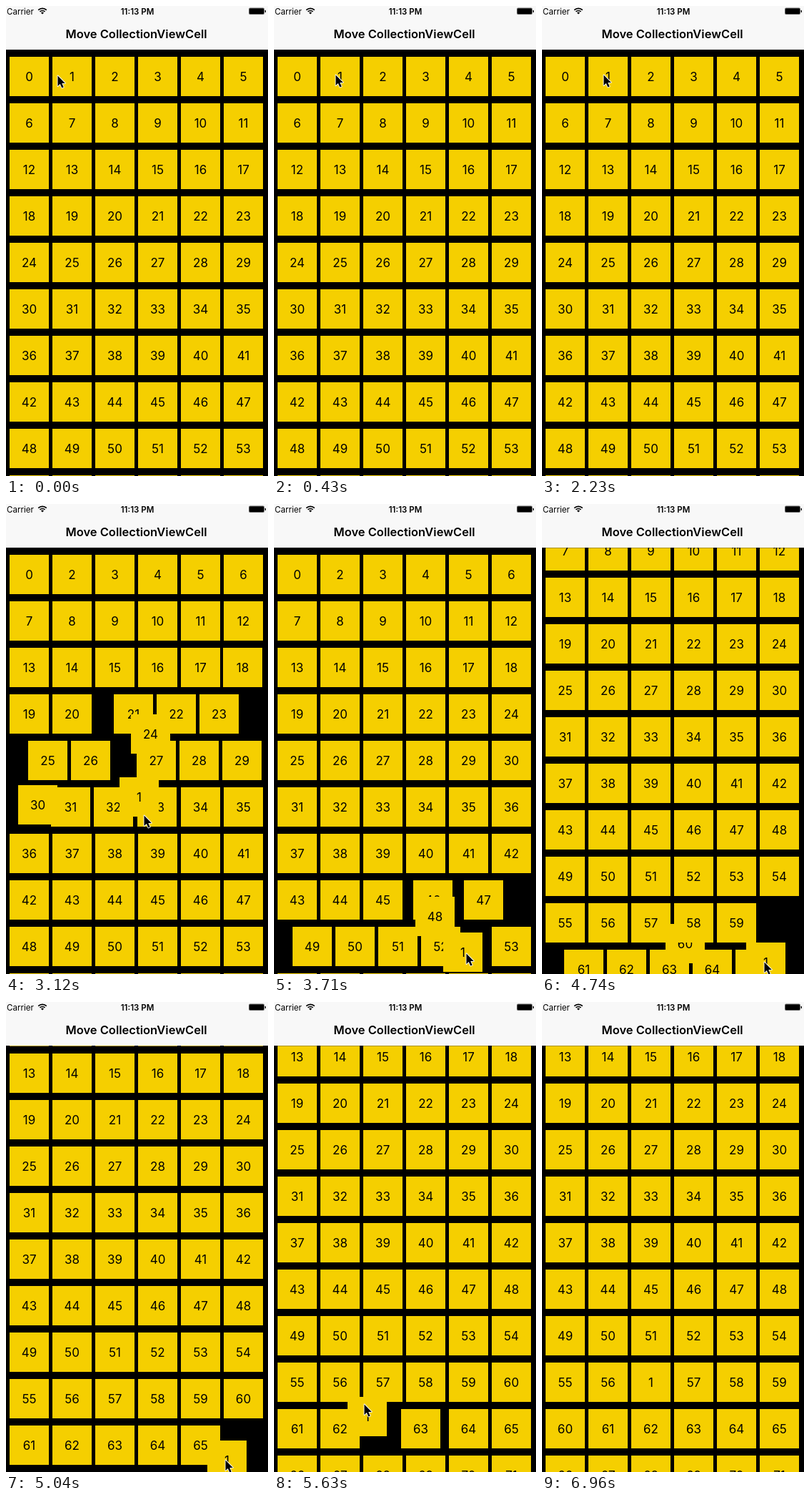
Animation of 367 by 657 pixels, one loop 7110 ms. Source, as an HTML page with a canvas:

```html
<!DOCTYPE html>
<html lang="en">
<head>
<meta charset="utf-8">
<title>Move CollectionViewCell</title>
<style>
html, body { margin: 0; width: 100%; height: 100%; overflow: hidden; background: #000; }
canvas { display: block; width: 367px; height: 657px; }
</style>
</head>
<body>
<canvas id="stage"></canvas>
<script>
const W = 367, H = 657, LOOP = 7110, STEP = 147.9, DRAG_START = 2230;
const CELL = 55, COLS = 6, COUNT = 72, NAV = 61;
const PICKUP = 2370, DROP = 6200, LAG = 50, SHIFT_TIME = 300;
const FONT = 'Inter, "Open Sans", sans-serif';

const canvas = document.getElementById('stage');
const ctx = canvas.getContext('2d');
const dpr = window.devicePixelRatio || 1;
canvas.width = W * dpr;
canvas.height = H * dpr;

// Key points of the pointer: time, x, y
const path = [
  [0, 73, 97], [430, 87, 96], [2450, 87, 96], [3270, 218, 512],
  [3490, 250, 589], [3600, 258, 624], [3710, 270, 628], [4100, 325, 638],
  [4740, 312, 640], [5050, 308, 640], [5400, 158, 620], [5560, 131, 587],
  [5630, 127, 562], [5800, 138, 537], [6250, 138, 537], [6810, 309, 651]
];

const clamp = (v, lo, hi) => Math.min(hi, Math.max(lo, v));
const mix = (a, b, u) => a + (b - a) * u;
const ease = u => { u = clamp(u, 0, 1); return u * u * (3 - 2 * u); };
const scrollAt = t => clamp((t - 3803) * 0.1045, 0, 152);

function snap(t) {
  if (t < DRAG_START) return t < 290 ? 0 : t < 430 ? 290 : 430;
  return DRAG_START + Math.floor((t - DRAG_START + 5) / STEP) * STEP;
}

function pointer(t) {
  const i = path.findIndex(p => p[0] > t);
  if (i < 0) return path[path.length - 1].slice(1);
  const a = path[i - 1], b = path[i], u = (t - a[0]) / (b[0] - a[0]);
  return [mix(a[1], b[1], u), mix(a[2], b[2], u)];
}

const slotX = i => 5 + 60 * (i % COLS);
const slotY = i => 71 + 65 * Math.floor(i / COLS);

function slotUnder(t) {
  const [x, y] = pointer(t);
  const col = clamp(Math.floor((x - 2) / 60), 0, COLS - 1);
  return col + COLS * Math.floor((y + scrollAt(t) - 65.5) / 65);
}

// Follow the drag once and note when the held cell claims each new slot
function traceClaims() {
  const claims = [];
  let last = 1;
  for (let t = PICKUP; t < DROP; t += 2) {
    const slot = slotUnder(t);
    if (slot !== last) claims.push({ start: t + LAG, slot });
    last = slot;
  }
  return claims;
}

const claims = traceClaims();
const finalSlot = claims[claims.length - 1].slot;

// Every claim adds its own eased displacement to the cells it pushes aside
function cellPosition(n, t) {
  const order = n ? n - 1 : 0;
  const indexFor = slot => order < slot ? order : order + 1;
  let index = indexFor(1), x = slotX(index), y = slotY(index);
  for (const { start, slot } of claims) {
    if (start > t) break;
    const next = indexFor(slot), u = ease((t - start) / SHIFT_TIME);
    x += (slotX(next) - slotX(index)) * u;
    y += (slotY(next) - slotY(index)) * u;
    index = next;
  }
  return [x, y];
}

function heldPosition(t, scroll) {
  if (t < PICKUP) return [slotX(1), slotY(1)];
  const [px, py] = pointer(Math.min(t, DROP) - LAG);
  const u = ease((t - DROP) / 250);
  return [mix(px - 27, slotX(finalSlot), u), mix(py - 27, slotY(finalSlot) - scroll, u)];
}

function text(str, x, y, size, weight = 400, align = 'center') {
  ctx.font = `${weight} ${size}px ${FONT}`;
  ctx.textAlign = align;
  ctx.fillStyle = '#000';
  ctx.fillText(str, x, y);
}

function drawCell(n, x, y) {
  x = Math.round(x);
  y = Math.round(y);
  if (y >= H || y + CELL <= 0) return;
  ctx.fillStyle = '#f5cf00';
  ctx.fillRect(x, y, CELL, CELL);
  text(n, x + 27.5, y + 33.5, 17);
}

function drawCells(t) {
  const scroll = Math.round(scrollAt(t));
  const place = n => {
    if (n === 1) return;
    const [x, y] = cellPosition(n, t);
    drawCell(n, x, y - scroll);
  };
  // Cells that scroll in later sit below the earlier ones
  for (let n = COUNT - 1; n >= 54; n--) place(n);
  for (let n = 0; n < 54; n++) place(n);
  drawCell(1, ...heldPosition(t, scroll));
}

function drawWifi(x, y) {
  ctx.strokeStyle = ctx.fillStyle = '#000';
  ctx.lineWidth = 1.7;
  for (const r of [5, 8.2]) {
    ctx.beginPath();
    ctx.arc(x, y, r, -Math.PI * 0.75, -Math.PI * 0.25);
    ctx.stroke();
  }
  ctx.beginPath();
  ctx.moveTo(x, y);
  ctx.arc(x, y, 2.8, -Math.PI * 0.75, -Math.PI * 0.25);
  ctx.fill();
}

function roundBox(color, x, y, w, h, r) {
  ctx.fillStyle = color;
  ctx.beginPath();
  ctx.roundRect(x, y, w, h, r);
  ctx.fill();
}

function drawBattery() {
  roundBox('#666', 340, 2.5, 22, 9.5, 2);
  roundBox('#000', 341, 3.5, 20, 7.5, 1);
  roundBox('#000', 362.7, 5.7, 1.3, 3.4, 0.6);
}

function drawBar() {
  ctx.fillStyle = '#f8f8f8';
  ctx.fillRect(0, 0, W, NAV);
  ctx.fillStyle = 'rgba(0, 0, 0, 0.3)';
  ctx.fillRect(0, NAV, W, 1);
  text('Carrier', 1, 11.5, 11.6, 400, 'left');
  drawWifi(51, 11.5);
  text('11:13 PM', 184, 11.5, 11.5, 600);
  drawBattery();
  text('Move CollectionViewCell', 182.5, 45, 16.5, 600);
}

function drawPointer(x, y) {
  const shape = [[0, 0], [0, 14.5], [3.3, 11.5], [5.8, 17], [8.2, 16], [5.8, 10.6], [10.3, 10.4]];
  ctx.beginPath();
  shape.forEach(([dx, dy]) => ctx.lineTo(x - 0.5 + dx, y + 0.5 + dy));
  ctx.closePath();
  ctx.lineJoin = 'round';
  ctx.lineWidth = 1.8;
  ctx.strokeStyle = '#fff';
  ctx.stroke();
  ctx.fillStyle = '#000';
  ctx.fill();
}

function draw(now) {
  const t = snap(now % LOOP);
  ctx.setTransform(dpr, 0, 0, dpr, 0, 0);
  ctx.fillStyle = '#000';
  ctx.fillRect(0, 0, W, H);
  drawCells(t);
  drawBar();
  if (t < 6900) drawPointer(...pointer(t).map(Math.round));
}

function tick() {
  draw(performance.now());
  requestAnimationFrame(tick);
}
tick();
</script>
</body>
</html>
```
